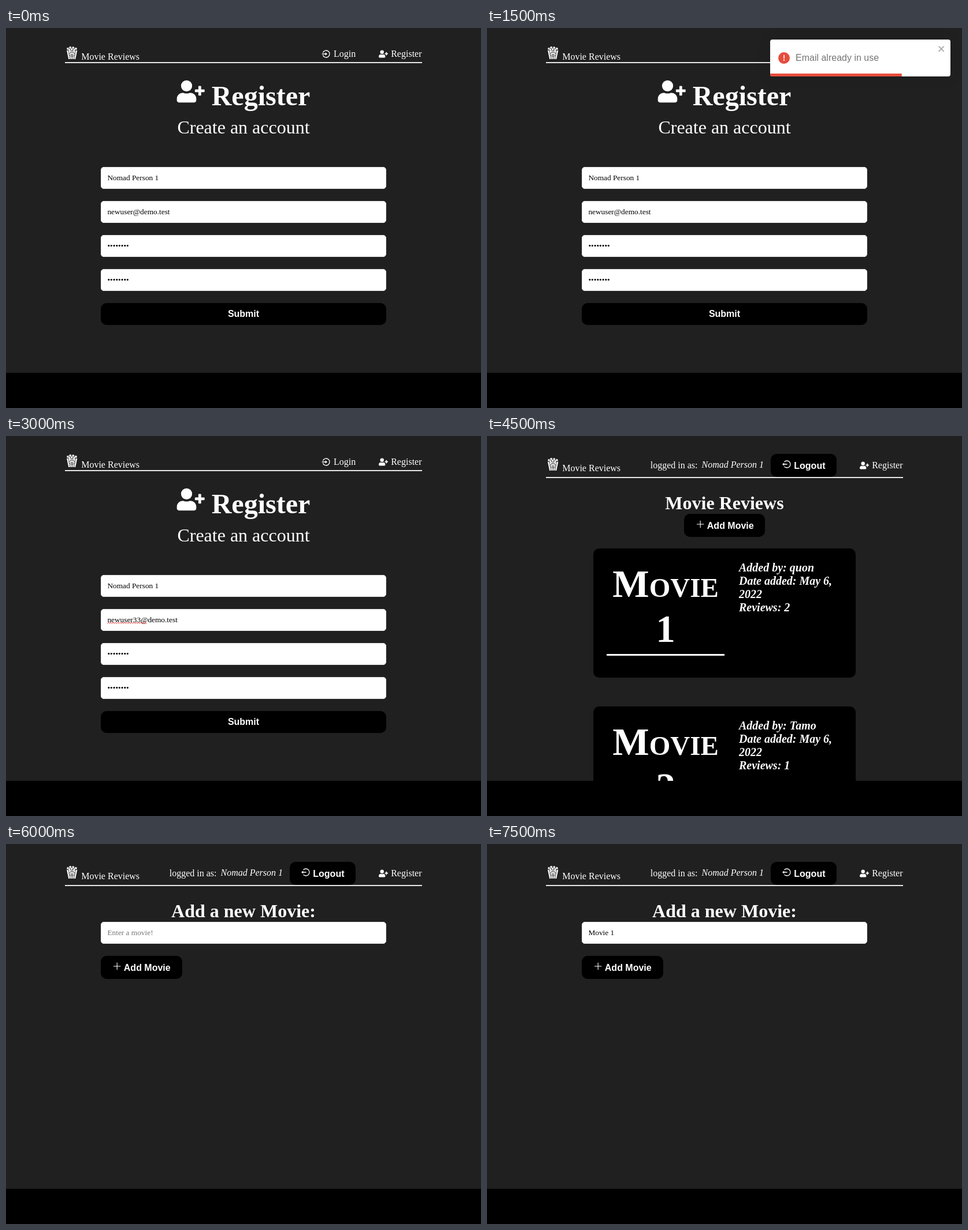
Animation of 822x659 px, one loop 8 s. Source, as an HTML page:

```html
<!DOCTYPE html>
<html lang="en">
<head>
<meta charset="utf-8">
<title>Movie Reviews</title>
<style>
  html, body { margin: 0; width: 100%; height: 100%; overflow: hidden; background: #000; }
  svg { display: block; }
  text { font-family: "Liberation Serif", "Times New Roman", serif; font-size: 16px; fill: #fff; white-space: pre; }
  .h1 { font-size: 48px; font-weight: bold; }
  .h2 { font-size: 32px; font-weight: bold; }
  .sub { font-size: 32px; }
  .mid { text-anchor: middle; }
  .em { font-style: italic; }
  .field { font-size: 13.3333px; fill: #000; }
  .hint { font-size: 13.3333px; fill: #757575; }
  .btn { font: bold 16px "Liberation Sans", Arial, sans-serif; }
  .alert { font: 16px "Liberation Sans", Arial, sans-serif; fill: #757575; }
  .film { font-size: 67.2px; font-weight: bold; font-variant: small-caps; text-anchor: middle; }
  .meta { font-size: 20px; font-weight: bold; font-style: italic; }
  .toast-box { fill: #fff; filter: drop-shadow(0 1px 10px rgba(0, 0, 0, .1)); }
</style>
</head>
<body>
<svg id="stage" width="822" height="659" viewBox="0 0 822 659"></svg>
<script>
const BG = '#202020', RED = '#e74c3c', LOOP = 8000;
const USER = 'Nomad Person 1';

const text = (x, y, cls, s) => `<text x="${x}" y="${y}" class="${cls}">${s}</text>`;
const box = (x, y, w, h, r, fill) =>
  `<rect x="${x}" y="${y}" width="${w}" height="${h}" rx="${r}" fill="${fill}"/>`;
const at = (x, y, scale, body) => `<g transform="translate(${x} ${y}) scale(${scale})" fill="#fff">${body}</g>`;
const layer = (name, body) => `<g id="${name}" visibility="hidden">${body}</g>`;

// Icons; user-plus uses a 640 x 512 grid, the others 24 x 24.
const userPlus = `<circle cx="224" cy="128" r="128"/>
  <rect x="416" y="208" width="224" height="64" rx="16"/><rect x="496" y="128" width="64" height="224" rx="16"/>
  <path d="M313.6 288h-16.7c-22.2 10.2-46.9 16-72.9 16s-50.6-5.8-72.9-16h-16.7C60.2 288 0 348.2 0 422.4V464c0 26.5 21.5 48 48 48h352c26.5 0 48-21.5 48-48v-41.6c0-74.2-60.2-134.4-134.4-134.4z"/>`;
const signIn = '<path d="M10 11V8l5 4-5 4v-3H1v-2h9zm-7.542 4h2.124A8 8 0 1 0 4.582 9H2.458A10 10 0 1 1 2.458 15z"/>';
const signOut = '<path d="M5 11h8v2H5v3l-5-4 5-4v3zm-1 7h2.708a8 8 0 1 0 0-12H4a10 10 0 1 1 0 12z"/>';
const kernel = (x, y, r) => `<circle cx="${x}" cy="${y}" r="${r}" stroke="${BG}" stroke-width=".6"/>`;
const popcorn = [[5, 5, 2.2], [9, 3, 2.3], [14, 3.2, 2.2], [18.6, 5, 2.3], [7.4, 6.6, 2], [11.6, 6, 2.2], [15.8, 6.6, 2]]
  .map(k => kernel(...k)).join('') +
  `<path d="M2.8 7.5L6 23h12l3.2-15.5-3.6 1.3-2.8-1-2.8 1.2-2.8-1.2-2.8 1z"/>
  <path d="M6.2 9l2.2 14M10.2 9l.6 14M13.8 9l-.6 14M17.8 9l-2.2 14" stroke="${BG}" stroke-width=".8"/>
  <ellipse cx="12" cy="14.5" rx="5" ry="3.4" stroke="${BG}" stroke-width=".9"/>
  <path d="M9 14l2 .8 1-.6 1 .6 2-.8M10 16h4" fill="none" stroke="${BG}" stroke-width=".8"/>`;

const register = dy => at(645.1, 38.6 + dy, 16 / 640, userPlus) + text(666.2, 50 + dy, '', 'Register');
const header = dy => at(102.2, 31 + dy, 1, popcorn) + text(130.2, 55 + dy, '', 'Movie Reviews');
const rule = y => `<rect x="102" y="${y}" width="618" height="2" fill="#e6e6e6"/>`;

const input = y =>
  `<rect x="164.5" y="${y + .5}" width="493" height="37" rx="4.5" fill="#fff" stroke="#e6e6e6"/>`;
const value = (y, s, cls = 'field') => text(175.4, y + 23, cls, s);
const addButton = (x, y, w) => box(x, y, w, 40, 10, '#000') +
  `<path d="M${x + 22} ${y + 18}h12.4M${x + 28.2} ${y + 11.8}v12.4" stroke="#fff" stroke-width="1.1"/>` +
  text(x + 39.8, y + 26, 'btn', 'Add Movie');

const card = (y, film, by, reviews) => box(184, y, 454, 224, 10, '#000') +
  text(309, y + 84, 'film', 'Movie') + text(309, y + 162, 'film', film) +
  box(207, y + 183, 204, 3, 0, '#fff') +
  [`Added by: ${by}`, 'Date added: May 6,', '2022', `Reviews: ${reviews}`]
    .map((s, i) => text(436, y + 40 + 23 * i, 'meta', s)).join('');

const squiggle = `<path d="M175.4 325.2${'l2 -1.8l2 1.8'.repeat(17)}" fill="none" stroke="#f00" stroke-width=".8"/>`;
const dots = '•'.repeat(8);

const layers = {
  guest: header(0) + rule(59) +
    at(546, 37, 16 / 24, signIn) + text(567, 50, '', 'Login') + register(0),
  form: at(295.7, 90.8, 48 / 640, userPlus) + text(355.7, 134, 'h1', 'Register') +
    text(411, 183, 'sub mid', 'Create an account') +
    [241, 300, 359, 418].map(input).join('') +
    value(241, USER) + value(359, dots) + value(418, dots) +
    box(164, 477, 494, 38, 10, '#000') + text(411, 501, 'btn mid', 'Submit'),
  taken: value(300, 'newuser@demo.test'),
  fresh: value(300, 'newuser33@demo.test') + squiggle,
  toast: '<rect class="toast-box" x="490" y="20" width="312" height="64" rx="4"/>' +
    `<path d="M490 79H717.7V84H494a4 4 0 0 1-4-4z" fill="${RED}"/>` +
    `<circle cx="514" cy="52" r="10" fill="${RED}"/>` +
    box(513.2, 46.6, 1.7, 6.7, .85, '#fff') + '<circle cx="514" cy="55.8" r="1.25" fill="#fff"/>' +
    text(534, 57, 'alert', 'Email already in use') +
    '<path d="M781.7 31.7l9 9m0-9l-9 9" stroke="#b3b3b3" stroke-width="2.1"/>',
  member: header(6) + rule(71) + text(282.7, 56, '', 'logged in as:') +
    text(371.5, 55, 'em', USER) + box(491, 31, 114, 40, 10, '#000') +
    at(511, 41, 16 / 24, signOut) + text(531.3, 57, 'btn', 'Logout') + register(6),
  list: text(411, 127, 'h2 mid', 'Movie Reviews') + addButton(341, 135, 140) +
    card(195, 1, 'quon', 2) + card(469, 2, 'Tamo', 1),
  add: text(411, 127, 'h2 mid', 'Add a new Movie:') + input(135) + addButton(164, 194, 141),
  empty: value(135, 'Enter a movie!', 'hint'),
  typed: value(135, 'Movie 1')
};

const steps = [
  [0, 'guest form taken'],
  [1500, 'guest form taken toast'],
  [3000, 'guest form fresh'],
  [4500, 'member list'],
  [6000, 'member add empty'],
  [7500, 'member add typed']
];

const stage = document.getElementById('stage');
stage.innerHTML = box(0, 0, 822, 598, 0, BG) +
  Object.entries(layers).map(([name, body]) => layer(name, body)).join('') +
  box(0, 598, 822, 61, 0, '#000');
const nodes = Object.keys(layers).map(name => document.getElementById(name));

function show(time) {
  const names = steps.findLast(([start]) => start <= time)[1].split(' ');
  for (const node of nodes) {
    node.setAttribute('visibility', names.includes(node.id) ? 'visible' : 'hidden');
  }
}

const origin = performance.now();
function tick() {
  show((performance.now() - origin) % LOOP);
  requestAnimationFrame(tick);
}
tick();
</script>
</body>
</html>
```
